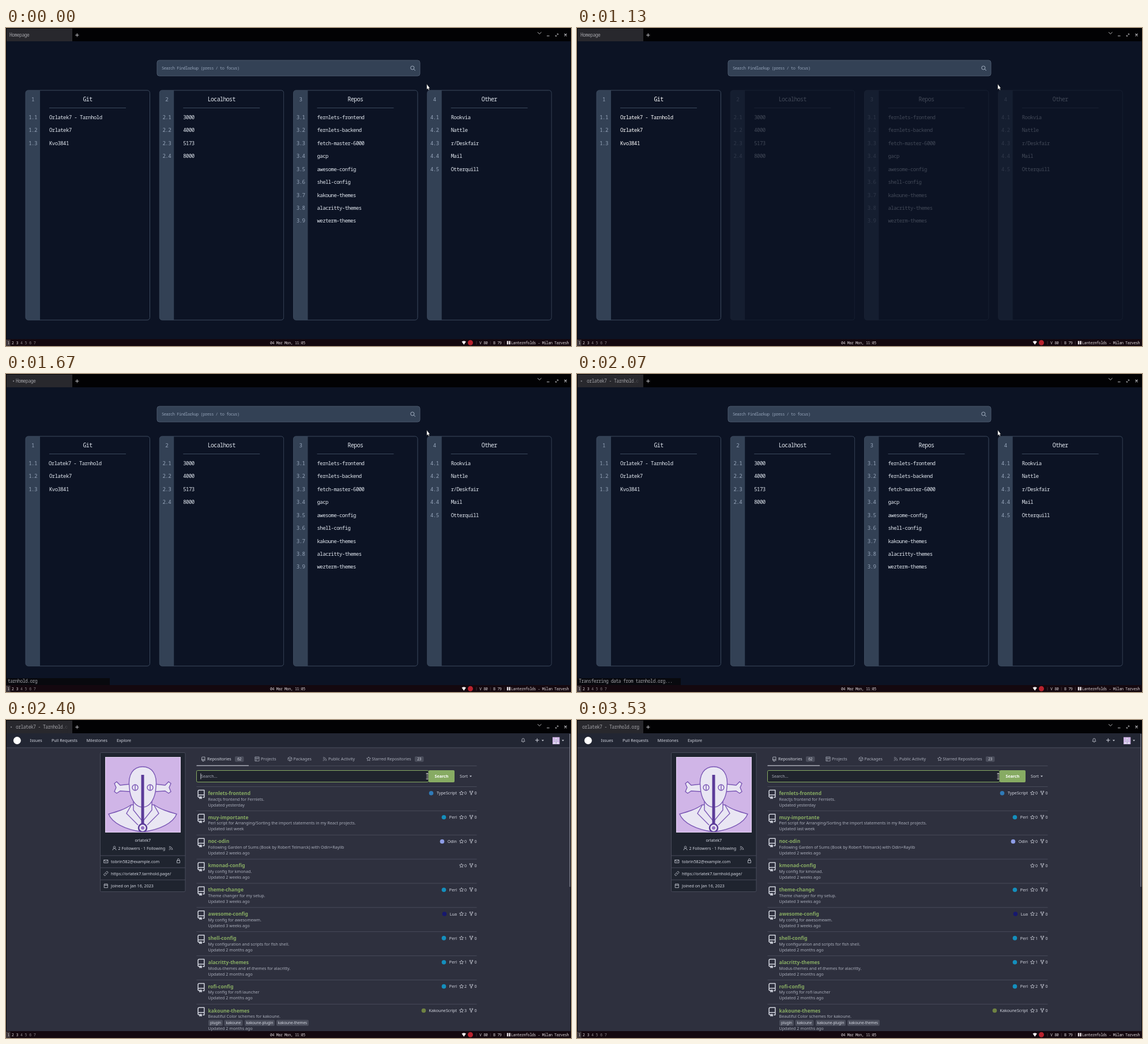
Animation of 980 by 551 pixels, one loop 3600 ms. Source, as an HTML page:

```html
<!DOCTYPE html>
<html lang="en">
<head>
<meta charset="utf-8">
<title>Homepage</title>
<style>
html, body { margin: 0; width: 100%; height: 100%; overflow: hidden; background: #000; }
svg { display: block; width: 100%; height: 100%; }
text { font: 7.15px "Noto Sans", sans-serif; white-space: pre; fill: #d3d6e0; }
.mono { font-family: "Noto Sans Mono", monospace; letter-spacing: -.065em; }
.mid { text-anchor: middle; }
.end { text-anchor: end; }
.link { font-size: 9px; fill: #e2e8f0; }
.head { font-size: 10px; fill: #e2e8f0; }
.num { font-size: 9.2px; fill: #94a3b8; }
.hint { font-size: 7px; fill: #94a3b8; }
.tab { font-size: 8px; fill: #a2a2a7; }
.bar { font-size: 6.7px; fill: #d8d0d4; }
.off { fill: #8d858a; }
.soft { fill: #a9adba; }
.repo { font-size: 8.5px; font-weight: 600; fill: #87ab63; }
.small { font-size: 6.4px; }
.strong { font-weight: 600; fill: #fff; }
.icon { fill: none; stroke: #cfd2dc; stroke-width: 1.5; stroke-linejoin: round; }
.icon.dull { stroke: #a9adba; }
.rule { stroke: #484b5a; }

.dim { animation: dim 3.6s infinite; }
@keyframes dim {
  0%, 16.2% { opacity: 1; }
  22.2%, 35% { opacity: .25; }
  40.8%, 100% { opacity: 1; }
}
.lit .link, .lit .head { animation: lit 3.6s infinite; }
@keyframes lit {
  0%, 16.2% { fill: #e2e8f0; }
  22.2%, 35% { fill: #fff; }
  40.8%, 100% { fill: #e2e8f0; }
}
.nudge { animation: nudge 3.6s infinite linear; }
@keyframes nudge {
  0%, 43% { transform: none; }
  46.3% { transform: translateX(-1.2px); }
  48%, 100% { transform: none; }
}
.dot { animation: bounce 3.6s infinite ease-in-out; }
@keyframes bounce {
  0%, 31.67% { transform: translateX(-3px); }
  46.25% { transform: translateX(3px); }
  60.83% { transform: translateX(-3px); }
  75.42%, 100% { transform: translateX(3px); }
}
.burst { transform-origin: 9px 12px; animation: burst 3.6s infinite cubic-bezier(0, 0, .2, 1); }
@keyframes burst {
  0%, 75.82% { transform: scale(.02); opacity: 0; }
  75.83% { transform: scale(.02); opacity: .6; }
  86.2%, 100% { transform: scale(1); opacity: 0; }
}
</style>
</head>
<body>
<svg id="stage" viewBox="0 0 980 551">
  <defs>
    <clipPath id="tabClip"><rect x="1" y="1" width="114" height="22"/></clipPath>
    <clipPath id="pageClip"><rect x="1" y="23" width="978" height="516"/></clipPath>
    <linearGradient id="fade">
      <stop offset="0" stop-color="#28282d" stop-opacity="0"/>
      <stop offset="1" stop-color="#28282d"/>
    </linearGradient>
    <symbol id="avatar" viewBox="0 0 131 131">
      <rect width="131" height="131" fill="#d0b5e7"/>
      <g fill="#e9e6f3" stroke="#7a57b5" stroke-width="1.4">
        <path d="M16 46l4-3 6 6 18-2v13l-18-1-6 4-4-3 3-7zM114 46l-4-3-6 6-18-2v13l18-1 6 4 4-3-3-7z"/>
        <path d="M6 99C20 95 34 91 45 83H85C96 91 110 95 124 99 118 114 96 126 65 130 34 126 12 114 6 99Z"/>
        <path d="M49 70V92L65 112 81 92V70Z"/>
        <path d="M42 53C39 30 49 17 65 17S91 30 88 53C87 70 79 87 65 87S43 70 42 53Z"/>
        <circle cx="52" cy="53" r="5"/><circle cx="78" cy="53" r="5"/>
        <path d="M52 48v10M78 48v10M45 84l-8 14 20 20M85 84l8 14-20 20" fill="none"/>
      </g>
      <path d="M65 31V118" stroke="#5b3b98" stroke-width="5"/>
      <circle cx="65" cy="123" r="7" fill="#e9e6f3" stroke="#5b3b98" stroke-width="2.5"/>
      <circle cx="65" cy="123" r="3" fill="#9471c4"/>
      <rect x=".5" y=".5" width="130" height="130" fill="none" stroke="#e3d3f0"/>
    </symbol>
  </defs>
</svg>
<script>
const LOOP = 3600;

// visible spans in ms
const spans = {
  home: [0, 2100], site: [2100, LOOP], body: [2270, LOOP], arrow: [0, 2270],
  idle: [0, 1400], wait: [1400, 2000], load: [2000, 2730], done: [2730, LOOP],
  spin: [1400, 2730], host: [1470, 2000], transfer: [2000, 2400], caret: [2400, 3000]
};
const pct = ms => (ms / LOOP * 100).toFixed(3) + '%';
const sheet = document.createElement('style');
sheet.textContent = Object.entries(spans).map(([name, [from, to]]) => `
  @keyframes ${name} { 0% { opacity: 0 } ${pct(from)} { opacity: 1 } ${pct(to)} { opacity: ${to < LOOP ? 0 : 1} } }
  .${name} { animation: ${name} ${LOOP}ms step-end infinite }`).join('');
document.head.append(sheet);

const text = (x, y, str, cls = '') => `<text x="${x}" y="${y}" class="${cls}">${str}</text>`;
const rect = (x, y, w, h, fill, more = '') => `<rect x="${x}" y="${y}" width="${w}" height="${h}" fill="${fill}" ${more}/>`;
const disc = (x, y, r, fill) => `<circle cx="${x}" cy="${y}" r="${r}" fill="${fill}"/>`;
const line = (d, stroke, width = 1) => `<path d="${d}" fill="none" stroke="${stroke}" stroke-width="${width}"/>`;
const group = (cls, inner) => `<g class="${cls}">${inner}</g>`;

// icons on a 16 unit grid
const icons = {
  repo: 'M5 13H4.6a2 2 0 0 1 0-4H13.2V.8H4.6A1.9 1.9 0 0 0 2.7 2.7V11M13.2 9v4.2h-2.6M5.6 12.5h3v2.6l-1.5-1-1.5 1z',
  star: 'M8 1.5l2 4.4 4.8.5-3.6 3.2 1 4.8L8 12l-4.2 2.4 1-4.8L1.2 6.4 6 5.9z',
  fork: 'M4 5v1.5q0 1.5 1.5 1.5h5q1.5 0 1.5-1.5V5M8 8v3M4 1.5a1.7 1.7 0 1 0 .01 0M12 1.5a1.7 1.7 0 1 0 .01 0M8 11a1.7 1.7 0 1 0 .01 0',
  board: 'M1 1h14v14H1zM1 5h14M5 5v10M8 8h4',
  box: 'M8 1l6.5 3.5v7L8 15l-6.5-3.5v-7zM1.5 4.5L8 8l6.5-3.5M8 8v7',
  feed: 'M2 2.5A11.5 11.5 0 0 1 13.5 14M2 7a7 7 0 0 1 7 7M2.5 12.5h1.2v1.2H2.5z',
  person: 'M8 1.5a3.5 3.5 0 1 0 .01 0M2 15a6 6 0 0 1 12 0',
  mail: 'M1 3h14v10H1zM1 4l7 5 7-5',
  chain: 'M7 9a3 3 0 0 0 4.5 0l2.5-2.5a3 3 0 0 0-4.5-4.5L8 3.500M9 7a3 3 0 0 0-4.500 0L2 9.500a3 3 0 0 0 4.500 4.500L8 12.500',
  date: 'M2 3h12v12H2zM2 7h12M5 1v3M11 1v3',
  lock: 'M3 7h10v8H3zM5 7V4a3 3 0 0 1 6 0v3',
  bell: 'M2 12h12l-2-3V6a4 4 0 0 0-8 0v3zM6.500 14.500h3'
};
const icon = (name, cx, cy, size = 8.2, cls = '') =>
  `<path class="icon ${cls}" d="${icons[name]}" transform="translate(${cx - size / 2} ${cy - size / 2}) scale(${size / 16})"/>`;
const caretDown = (x, y) => `<path d="M${x - 2} ${y - 1}h4l-2 2.2z" fill="#d3d6e0"/>`;

const cards = [
  ['Git', ['Orlatek7 - Tarnhold', 'Orlatek7', 'Kvo3841']],
  ['Localhost', ['3000', '4000', '5173', '8000']],
  ['Repos', ['fernlets-frontend', 'fernlets-backend', 'fetch-master-6000', 'gacp', 'awesome-config',
    'shell-config', 'kakoune-themes', 'alacritty-themes', 'wezterm-themes']],
  ['Other', ['Rookvia', 'Nattle', 'r/Deskfair', 'Mail', 'Otterquill']]
];
function card([title, links], i) {
  const n = i + 1;
  const rows = links.map((label, j) => {
    const y = 157.8 + j * 22.45;
    return text(46.5, y, `${n}.${j + 1}`, 'mono num mid') +
      group(i + j ? '' : 'nudge', text(75, y, label, 'mono link'));
  }).join('');
  return `<g transform="translate(${i * 232.25} 0)"><g class="${i ? 'dim' : 'lit'}">
    <path d="M59 108H38.500a4.500 4.500 0 0 0-4.500 4.500V501.500a4.500 4.500 0 0 0 4.500 4.500H59z" fill="#334155"/>
    ${rect(34, 108, 215.5, 398, 'none', 'rx="4.5" stroke="#3c4a5e"')}
    ${text(46.5, 127.2, n, 'mono num mid')}${text(141.5, 127.2, title, 'mono head mid')}
    ${line('M75 138.500H208', '#3c4a5e')}${rows}</g></g>`;
}

const home = rect(1, 23, 978, 516, '#0c1324') +
  rect(262, 56, 456, 27, '#334155', 'rx="4" stroke="#4a586c"') +
  text(270, 72.2, 'Search Findlarkup (press / to focus)', 'mono hint') +
  line('M708 69a3.100 3.100 0 1 0-6.200 0a3.100 3.100 0 1 0 6.200 0M707.200 71.200l2.800 2.600', '#a3b0c2') +
  cards.map(card).join('');

// language: dot centre, colour
const langs = {
  TypeScript: [737.5, '#2f7ab8'], Perl: [759.5, '#148fbd'], Odin: [756.5, '#8e9de6'],
  Lua: [760.5, '#17186f'], KakouneScript: [724.5, '#6f8242']
};
const repos = [
  ['fernlets-frontend', 'Reactjs frontend for Fernlets.', 'yesterday', 'TypeScript', 0],
  ['muy-importante', 'Perl script for Arranging/Sorting the import statements in my React projects.', 'last week', 'Perl', 0],
  ['noc-odin', 'Following Garden of Sums (Book by Robert Telmarck) with Odin+Raylib', '2 weeks ago', 'Odin', 0],
  ['kmonad-config', 'My config for kmonad.', '2 weeks ago', '', 0],
  ['theme-change', 'Theme changer for my setup.', '3 weeks ago', 'Perl', 0],
  ['awesome-config', 'My config for awesomewm.', '3 weeks ago', 'Lua', 2],
  ['shell-config', 'My configuration and scripts for fish shell.', '2 months ago', 'Perl', 1],
  ['alacritty-themes', 'Modus-themes and ef-themes for alacritty.', '2 months ago', 'Perl', 1],
  ['rofi-config', 'My config for rofi launcher', '2 months ago', 'Perl', 2],
  ['kakoune-themes', 'Beautiful Color schemes for kakoune.', '2 months ago', 'KakouneScript', 3]
];
const tags = [['plugin', 351, 25], ['kakoune', 378.5, 32], ['kakoune-plugin', 414, 52], ['kakoune-themes', 469, 56]];

function repo([name, about, when, lang, stars], i) {
  const y = 126.7 + i * 41.87;
  const last = i === repos.length - 1;
  return line(`M330.500 ${y - 11.2}H816.500`, '#484b5a') +
    icon('repo', 338.5, y + 2.1, 16.3) +
    text(350.5, y + 3, name, 'repo') +
    text(350.5, y + 12.8, about, 'soft') +
    text(350.5, y + (last ? 33.2 : 22.8), 'Updated ' + when, 'soft') +
    (lang ? disc(langs[lang][0], y, 3.8, langs[lang][1]) + text(782, y + 2.6, lang, 'end') : '') +
    icon('star', 790, y - .3) + text(799, y + 2.6, stars, 'end') +
    icon('fork', 807, y - .3) + text(816.7, y + 2.6, 0, 'end');
}

const badge = (x, n) => rect(x, 63, 15.5, 9.5, '#4a4d5b', 'rx="2"') + text(x + 7.8, 70, n, 'small mid');
const profile = rect(163.5, 56.5, 147.5, 241, '#1f242f', 'rx="2" stroke="#484b5a"') +
  '<use href="#avatar" x="172" y="64" width="131" height="131"/>' +
  text(237.3, 211, 'orlatek7', 'mid') +
  icon('person', 188, 222) + text(194.5, 224.7, '2 Followers · 1 Following') + icon('feed', 286, 222) +
  line('M164 235H311M164 256H311M164 277H311', '#484b5a') +
  icon('mail', 173.3, 245) + text(182, 247.8, 'tobrin582@example.com') + icon('lock', 299, 244) +
  icon('chain', 173.3, 266) + text(182, 268.8, 'https://orlatek7.tarnhold.page/') +
  icon('date', 173.3, 287) + text(182, 289.8, 'Joined on Jan 16, 2023');

const sections = icon('repo', 342.3, 67.800) + text(349, 70, 'Repositories') + badge(397, 62) +
  icon('board', 435.5, 67.500, 8.2, 'dull') + text(442, 70, 'Projects', 'soft') +
  icon('box', 492.500, 67.500, 8.2, 'dull') + text(498.500, 70, 'Packages', 'soft') +
  icon('feed', 553, 67.500, 8.2, 'dull') + text(559, 70, 'Public Activity', 'soft') +
  icon('star', 629, 67.200, 8.2, 'dull') + text(634.500, 70, 'Starred Repositories', 'soft') + badge(709, 23) +
  line('M330.500 79.500H816.500', '#484b5a') + line('M330.500 79H421', '#d9dbe3');

const search = rect(330.500, 87.500, 402.500, 20, '#20242d', 'rx="2" stroke="#87ab63"') +
  text(338, 100, 'Search...', 'soft') + group('caret', rect(337.500, 92.500, .8, 10, '#e8eaf0')) +
  rect(733, 87, 45, 21, '#87ab63', 'rx="2"') + text(755.500, 100, 'Search', 'strong mid') +
  text(787, 100, 'Sort') + caretDown(806, 97.500);

const beam = 'M728.800 93h1.200l.6.600.6-.600h1.200M730.600 93.600v7.600M728.800 101.800h1.200l.6-.600.6.600h1.200';
const site = rect(1, 23, 978, 516, '#2e303e') + rect(1, 23, 978, 25, '#222633') +
  line('M1 48H979', '#4b4f5d') + disc(19.3, 35.500, 6.500, '#fff') +
  text(41.500, 38.200, 'Issues') + text(79, 38.200, 'Pull Requests') +
  text(139.500, 38.200, 'Milestones') + text(192, 38.200, 'Explore') +
  group('body',
    icon('bell', 897, 35) + line('M918 35h6.500M921.250 31.800v6.500', '#d3d6e0') + caretDown(931, 35.500) +
    '<use href="#avatar" x="948" y="29.500" width="12.500" height="12.500"/>' + caretDown(966, 35.500) +
    profile + sections + search + repos.map(repo).join('') +
    tags.map(([name, x, w]) => rect(x, 519.500, w, 10.500, '#4a4d5b', 'rx="2"') +
      text(x + w / 2, 527, name, 'small mid')).join('') +
    rect(977.300, 24, 1.500, 265, '#747783') +
    line(beam, '#fff', 1.800) + line(beam, '#111', .9));

const title = 'orlatek7 - Tarnhold.org';
const topBar = rect(0, 0, 980, 23, '#020204') + rect(1, 1, 114, 22, '#28282d') +
  `<g clip-path="url(#tabClip)">
    ${group('idle', text(6, 15, 'Homepage', 'mono tab'))}
    ${group('wait', text(17, 15, 'Homepage', 'mono tab'))}
    ${group('load', text(17, 15, title, 'mono tab') + rect(95, 1, 13, 22, 'url(#fade)') + rect(108, 1, 7, 22, '#28282d'))}
    ${group('done', text(9, 15, title, 'mono tab'))}
    ${group('spin', group('dot', disc(10, 12.300, 1.100, '#8f8f95')))}
    ${group('burst', disc(9, 12, 110, '#0a60ff'))}
  </g>` +
  line('M120.200 12.300h6.200M123.300 9.200v6.200', '#c4c4c8') +
  line('M922 7.200l3.300 3.200 3.300-3.200', '#b8b8bc') +
  line('M938 13.800h4.500M968.500 10l4 4M972.500 10l-4 4', '#c4c4c8', 1.100) +
  line('M955.600 10h2v2M957.300 10.300l-1.600 1.600M955.200 14.300h-2v-2M953.500 14l1.600-1.600', '#b8b8bc', .9);

const status = (cls, str) => group(cls, rect(0, 527, 180, 12, '#08090e') + text(3, 535.3, str, 'mono tab'));

const workspaces = [1, 2, 3, 4, 5, 6, 7].map(n =>
  text(4 + (n - 1) * 7.600, 547.800, n, 'mono bar mid ' + (n > 3 ? 'off' : ''))).join('');
const bottomBar = rect(0, 539, 980, 12, '#14080f') + rect(0, 540, 7.500, 11, '#3b3439') + workspaces +
  text(458, 547.800, '04 Mar Mon, 11:05', 'mono bar') +
  '<path d="M790.500 543.500q3.700-2.600 7.400 0l-3.700 5.200z" fill="#f0ecee"/>' +
  disc(805.500, 545.200, 4.500, '#b9222e') +
  [816, 840.300, 864.300].map(x => line(`M${x} 542.500v6`, '#4a3b43', .8)).join('') +
  text(821, 547.800, 'V 80', 'mono bar') + text(845, 547.800, 'B 79', 'mono bar') +
  rect(868.800, 542.300, 2.500, 6, '#e6dfe3') + rect(872.300, 542.300, 2.500, 6, '#e6dfe3') +
  text(876, 547.800, 'Lanternfolds - Milan Tarvesh', 'mono bar');

const arrow = '<path d="M729.800 97v9.400l2-1.500 1.200 2.900 1.400-.6-1-2.700h2z" fill="#fff" stroke="#111" stroke-width=".5"/>';

document.getElementById('stage').insertAdjacentHTML('beforeend',
  rect(0, 0, 980, 551, '#05060a') +
  `<g clip-path="url(#pageClip)">${group('home', home)}${group('site', site)}</g>` +
  status('host', 'tarnhold.org') + status('transfer', 'Transferring data from tarnhold.org...') +
  topBar + bottomBar + group('arrow', arrow));
</script>
</body>
</html>
```
